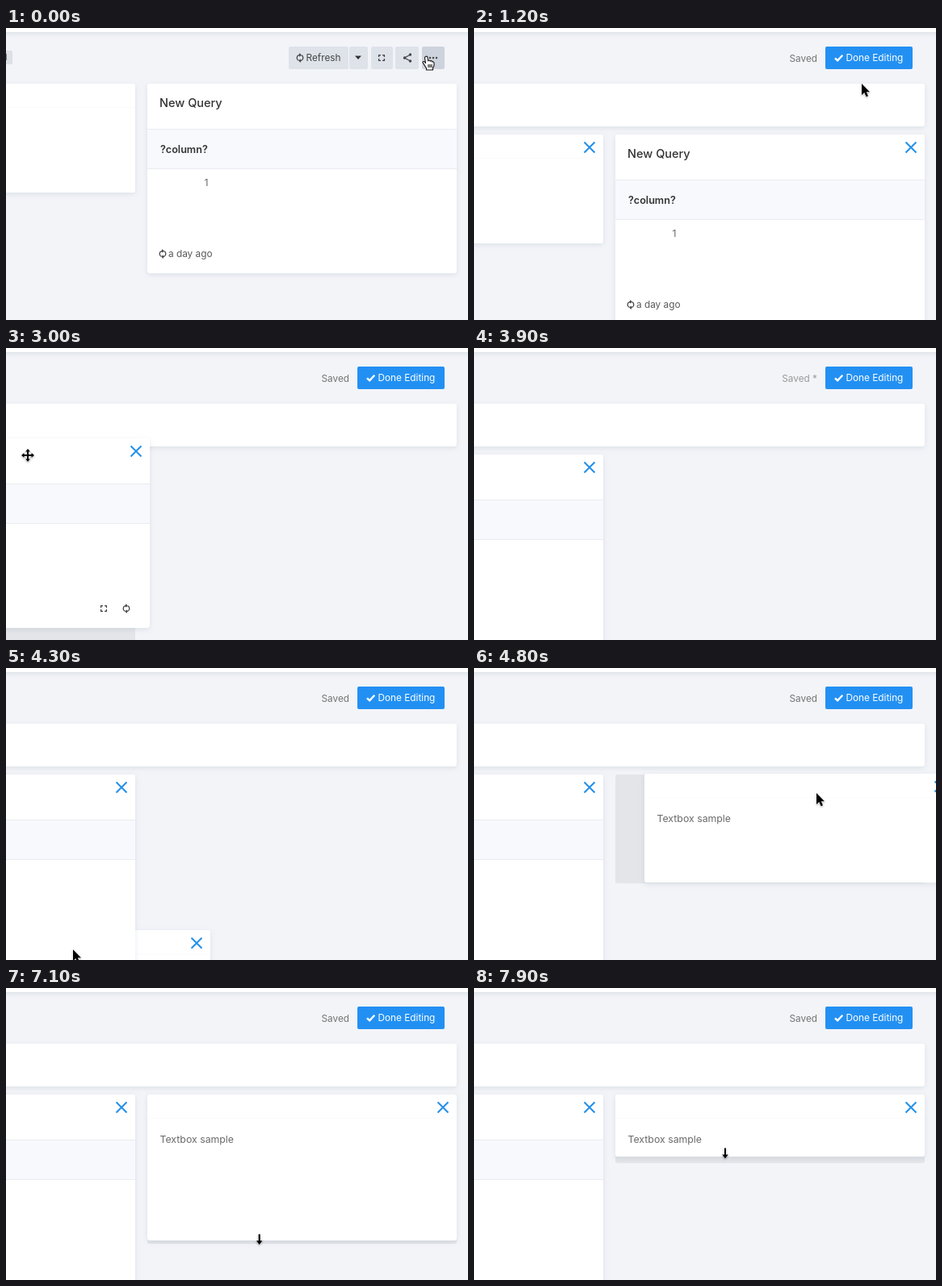
Write an HTML page that moves like this. It is 572 px wide and 362 px high and loops after 8 s.

```html
<!DOCTYPE html>
<html lang="en">
<head>
<meta charset="utf-8">
<title>Dashboard editing</title>
<style>
  html, body { margin: 0; width: 100%; height: 100%; overflow: hidden; background: #f3f4f8; }
  svg { display: block; }
  text { font: 11.8px Inter, Roboto, sans-serif; fill: #595959; }
  .card { fill: #fff; filter: drop-shadow(0 2px 3px rgba(102, 136, 153, .17)); }
  .title { font-size: 14.5px; font-weight: 500; fill: #333; }
  .column { font-size: 12.6px; font-weight: 600; fill: #333; }
  .body { font-size: 12.3px; fill: #6a6a6a; }
  .line { fill: #e9ecf0; }
  .btn { fill: #dee3ea; }
  .icon { fill: none; stroke: #444; stroke-width: 1.3; }
  .close { fill: none; stroke: #2490e8; stroke-width: 2; }
  .ghost { fill: #e4e5e9; }
  .menu { fill: #fff; filter: drop-shadow(0 1px 3px rgba(0, 0, 0, .2)); }
  .pointer { stroke: #fff; stroke-width: 1; paint-order: stroke; filter: drop-shadow(0 1px 1px rgba(0, 0, 0, .3)); }
</style>
</head>
<body>
<svg width="572" height="362" viewBox="0 0 572 362">
  <defs>
    <g id="refresh" class="icon">
      <path d="M-1.6 3.4A3.6 3.6 0 0 1-1.5-3.3L.5-3.6M1.6-3.4A3.6 3.6 0 0 1 1.5 3.3L-.5 3.6"/>
      <path d="M-.8-5.4L.8-3.6-.8-1.9M.8 5.4L-.8 3.6 .8 1.9"/>
    </g>
    <path id="expand" class="icon" d="M-3.4-1V-3.4H-1M1-3.4H3.4V-1M3.4 1V3.4H1M-1 3.4H-3.4V1"/>
    <path id="close" class="close" d="M-6.5-6.5L6.5 6.5M6.5-6.5L-6.5 6.5"/>
  </defs>

  <rect width="572" height="362" fill="#f3f4f8"/>
  <rect class="card" x="-10" y="-10" width="592" height="15"/>

  <g id="viewTools">
    <rect x="-4" y="28" width="12" height="17" rx="2" fill="#dcdfe4"/>
    <path d="M.5 32V40" stroke="#777"/>
    <rect class="btn" x="350" y="23" width="74" height="28" rx="2"/>
    <rect class="btn" x="425" y="23" width="23" height="28" rx="2"/>
    <rect class="btn" x="452" y="23" width="27" height="28" rx="2"/>
    <rect class="btn" x="482" y="23" width="29" height="28" rx="2"/>
    <rect x="515" y="23" width="28" height="28" rx="2" fill="#cdd3dc"/>
    <use href="#refresh" x="364" y="37"/>
    <text x="371.5" y="41" style="fill:#444">Refresh</text>
    <path d="M432 34.5H440L436 39Z" fill="#333"/>
    <use href="#expand" x="465" y="37"/>
    <path class="icon" d="M500.5 33L493.5 37 500.5 41"/>
    <g fill="#444">
      <circle cx="500.5" cy="33" r="1.7"/><circle cx="493.5" cy="37" r="1.7"/><circle cx="500.5" cy="41" r="1.7"/>
      <circle cx="525" cy="37" r="1.2"/><circle cx="529" cy="37" r="1.2"/><circle cx="533" cy="37" r="1.2"/>
    </g>
  </g>

  <g id="editTools">
    <text id="status" x="425" y="42" text-anchor="end"></text>
    <rect x="435" y="23" width="108" height="28" rx="2" fill="#2290f3"/>
    <path d="M447 37.3L450.2 40.4 456.3 33.8" fill="none" stroke="#fff" stroke-width="2.4"/>
    <text x="460.5" y="41" style="fill:#fff">Done Editing</text>
    <rect class="card" x="-10" y="69" width="568" height="53" rx="3"/>
  </g>

  <rect id="ghost" class="ghost" width="383" rx="2"/>

  <g id="textbox">
    <rect id="textboxPanel" class="card" width="383" rx="3"/>
    <rect y="29" width="383" height="1" fill="#fbfbfc"/>
    <text class="body" x="15.5" y="60">Textbox sample</text>
    <use class="editing" href="#close" x="366" y="16"/>
  </g>

  <g id="query">
    <rect class="card" width="383" height="235" rx="3"/>
    <rect y="56" width="383" height="50" fill="#f7f9fd"/>
    <rect class="line" y="56" width="383" height="1"/>
    <rect class="line" y="105" width="383" height="1"/>
    <text class="title" x="15" y="29">New Query</text>
    <text class="column" x="16" y="86">?column?</text>
    <text class="body" x="75.5" y="127" text-anchor="end">1</text>
    <use href="#refresh" x="19" y="211"/>
    <text x="26" y="215">a day ago</text>
    <use class="editing" href="#close" x="366" y="16"/>
    <g id="hoverIcons">
      <use href="#expand" x="326" y="211"/>
      <use href="#refresh" x="354" y="211"/>
    </g>
  </g>

  <g id="menu">
    <rect class="menu" x="384" y="52" width="159" height="113" rx="2"/>
    <rect x="384" y="57" width="159" height="34" fill="#f1f3f6"/>
    <text x="401" y="78">Edit</text>
    <text x="401" y="112">Unpublish</text>
    <text x="401" y="146">Archive</text>
  </g>

  <g id="cursors">
    <path id="hand" d="M-2.5-7.5C-1-8.5 0-7.5 0-6.5L.5-2.5C1.5-3.5 3-3 3.2-2 4.5-2.8 5.5-2 5.8-1 7-1.6 8-.6 8 .6V3.5L6.5 6.5V9H-1.5V7L-6-.2C-6.3-1.6-4.5-2-3.5-.8L-2.4.8-3.5-6C-3.6-6.8-3.2-7.3-2.5-7.5ZM1 2V6M3 2V6M5 2V6" fill="#fff" stroke="#111" stroke-width="1.1"/>
    <path id="arrow" class="pointer" d="M0 0V14L3.3 11 5.6 16.3 8 15.2 5.8 10.2H10Z"/>
    <path id="move" class="pointer" d="M0-8L3-4.5H1V-1H4.5V-3L8 0 4.5 3V1H1V4.5H3L0 8-3 4.5H-1V1H-4.5V3L-8 0-4.5-3V-1H-1V-4.5H-3Z"/>
    <path id="resize" class="pointer" d="M-1-6.5H1V1.5H3.8L0 6.5-3.8 1.5H-1Z"/>
  </g>
</svg>
<script>
const LOOP = 8000, STEP = 100;
const COLUMN = 398 / 3, ROW = 50, GAP = 15, LEFT = -223, RIGHT = 175, TOP = 132;
const $ = id => document.getElementById(id);
const editingParts = document.querySelectorAll('.editing');

// Each key is [time, ...values]; values run linearly between keys.
const tracks = {
  query: [[600, RIGHT, 69], [700, RIGHT, TOP], [2400, RIGHT, TOP], [2500, 128, 129], [2600, -2, 120],
    [2800, -140, 104], [3000, -205, 112], [3200, -226, 121], [3400, -226, 121], [3600, LEFT, TOP]],
  textbox: [[600, LEFT, 69], [700, LEFT, TOP], [2500, LEFT, TOP], [2600, LEFT, 382], [4100, LEFT, 382],
    [4300, -130, 325], [4500, 85, 205], [4600, 160, 160], [4800, 211, 131], [5000, 211, 131], [5200, RIGHT, TOP]],
  height: [[6400, 135], [6900, 197], [7000, 197], [7300, 149], [7900, 77]],
  pointer: [[0, 522, 43], [100, 515, 58], [200, 500, 73], [600, 500, 73], [700, 494, 71], [1200, 480, 69],
    [1600, 480, 69], [2000, 418, 140], [2300, 407, 153], [2400, 407, 153]],
  leave: [[3400, 6, 142], [3800, -20, 165]],
  resize: [[5000, 424, 155], [5600, 538, 266], [5700, 538, 266], [6100, 315, 265], [6400, 315, 265],
    [6900, 314, 328], [7000, 314, 328], [7300, 313, 279], [7900, 311, 205]]
};

function at(name, t) {
  const keys = tracks[name];
  const next = keys.findIndex(key => key[0] > t);
  if (next === 0) return keys[0].slice(1);
  if (next < 0) return keys[keys.length - 1].slice(1);
  const a = keys[next - 1], b = keys[next];
  const k = (t - a[0]) / (b[0] - a[0]);
  return a.slice(1).map((v, i) => v + (b[i + 1] - v) * k);
}

const show = (el, on) => { el.style.display = on ? '' : 'none'; };
const place = (el, [x, y]) => el.setAttribute('transform', `translate(${x} ${y})`);
const during = (t, from, to) => t >= from && t < to;
const snap = x => LEFT + COLUMN * Math.round((x - LEFT) / COLUMN);

function pointerPosition(t, query, textbox) {
  if (t < 2500) return at('pointer', t);
  if (t < 3500) return [query[0] + 232, query[1] + 21];
  if (t < 4100) return at('leave', t);
  if (t < 5100) return [textbox[0] + 213, textbox[1] + 24];
  return at('resize', t);
}

function pointerKind(t) {
  if (t < 700) return 'hand';
  if (during(t, 2100, 3600)) return 'move';
  return t < 5900 ? 'arrow' : 'resize';
}

function placeGhost(t, query, textbox, height) {
  const ghost = $('ghost');
  const movingQuery = during(t, 2500, 3500);
  const movingText = during(t, 4200, 5100);
  const sizing = t >= 6500;
  show(ghost, movingQuery || movingText || sizing);
  const x = movingQuery ? snap(query[0]) : Math.min(RIGHT, snap(textbox[0]));
  const y = movingText && x < RIGHT - 1 ? 382 : TOP;
  place(ghost, [x, y]);
  const rows = movingQuery ? 5 : Math.round((height + GAP) / ROW);
  ghost.setAttribute('height', rows * ROW - GAP);
}

function draw(t) {
  const editing = t >= 700;
  const query = at('query', t), textbox = at('textbox', t), [height] = at('height', t);
  const unsaved = during(t, 3700, 4100) || during(t, 5300, 5900);

  show($('viewTools'), !editing);
  show($('editTools'), editing);
  show($('menu'), during(t, 100, 700));
  show($('hoverIcons'), during(t, 2000, 3600));
  editingParts.forEach(el => show(el, editing));
  $('status').textContent = unsaved ? 'Saved *' : 'Saved';
  $('status').style.fill = unsaved ? '#9a9a9a' : '#747474';

  place($('query'), query);
  place($('textbox'), textbox);
  $('textboxPanel').setAttribute('height', height);
  placeGhost(t, query, textbox, height);

  const kind = pointerKind(t);
  for (const el of $('cursors').children) show(el, el.id === kind);
  place($('cursors'), pointerPosition(t, query, textbox));
}

const start = performance.now();
function tick() {
  const t = (performance.now() - start) % LOOP;
  draw(Math.floor(t / STEP) * STEP);
  requestAnimationFrame(tick);
}
tick();
</script>
</body>
</html>
```
